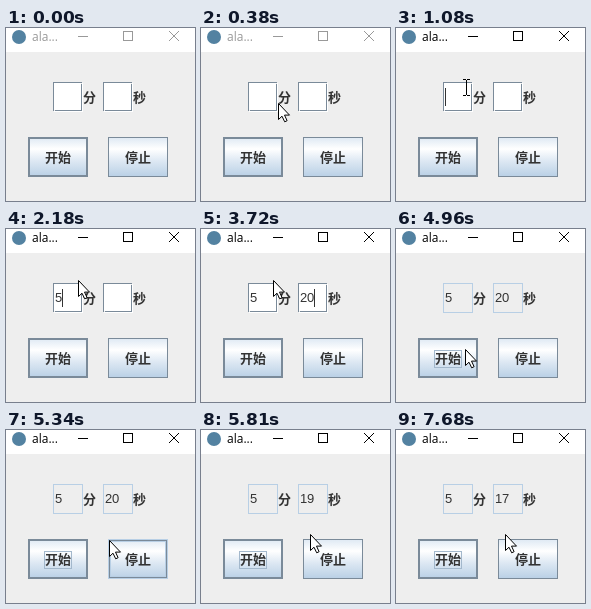
An HTML page with a canvas for the animation above (8 s loop, 189 by 173 pixels).

```html
<!DOCTYPE html>
<html lang="zh-CN">
<head>
<meta charset="utf-8">
<style>
  html, body { margin: 0; width: 100%; height: 100%; overflow: hidden; background: #eee; }
  canvas { display: block; }
</style>
</head>
<body>
<canvas id="stage" width="189" height="173"></canvas>
<script>
const ctx = document.getElementById('stage').getContext('2d');
const LOOP = 8000, TICK = 75, BLINK = 490;
const ENTER = 70, FOCUS = 620, PRESS = 4580, RELEASE = 4650;
const BACK = '#eee', DARK = '#7a8a99', LIGHT = '#b8cfe5', INK = '#333';
const CJK = 'bold 13px "Noto Sans CJK SC", "Noto Sans CJK", sans-serif';
const DIGITS = '13px "Liberation Sans", Arial, sans-serif';

// Pointer moves: from and until (ms), then the place reached
const MOVES = [
  [0, 370, 77, 75], [370, 620, 67, 67],
  [1000, 1160, 72, 51], [3960, 4040, 65, 50],
  [4100, 4560, 59, 123], [4890, 5430, 105, 110], [5570, 5800, 109, 104]
];
const KEYS = [[1700, '5'], [2560, '\t'], [2940, '2'], [3260, '0']];

function pointerAt(time) {
  const t = Math.floor(time / TICK) * TICK;
  let x = 98, y = 160;
  for (const [from, until, toX, toY] of MOVES) {
    const left = 1 - Math.min(1, Math.max(0, (t - from) / (until - from)));
    const eased = 1 - left * left;
    x += (toX - x) * eased;
    y += (toY - y) * eased;
  }
  return { x: Math.round(x), y: Math.round(y) };
}

const inside = (p, x, y, w, h) => p.x >= x && p.x < x + w && p.y >= y && p.y < y + h;

function fill(color, x, y, w, h) {
  ctx.fillStyle = color;
  ctx.fillRect(x, y, w, h);
}

function frame(color, x, y, w, h) {
  ctx.strokeStyle = color;
  ctx.lineWidth = 1;
  ctx.strokeRect(x + .5, y + .5, w - 1, h - 1);
}

function text(str, x, y, font, color = INK, align = 'left') {
  ctx.font = font;
  ctx.fillStyle = color;
  ctx.textAlign = align;
  ctx.fillText(str, x, y);
}

function titleBar(active) {
  const color = active ? '#000' : '#999';
  fill('#fff', 0, 0, 189, 24);
  ctx.fillStyle = '#5382a1';
  ctx.beginPath();
  ctx.arc(13, 9, 7, 0, 7);
  ctx.fill();
  text('ala...', 26, 13, '12px "Open Sans", sans-serif', color);
  fill(color, 72, 8, 10, 1);
  frame(color, 117, 3, 10, 10);
  ctx.beginPath();
  ctx.moveTo(163, 3);
  ctx.lineTo(173, 13);
  ctx.moveTo(173, 3);
  ctx.lineTo(163, 13);
  ctx.stroke();
}

function field(x, value, unit, locked) {
  const y = 54;
  if (locked) {
    frame(LIGHT, x, y, 30, 30);
  } else {
    fill('#fff', x + 1, y + 1, 29, 29);
    frame(DARK, x, y, 29, 29);
    fill(BACK, x + 1, y + 28, 1, 1);
    fill(BACK, x + 28, y + 1, 1, 1);
  }
  [...value].forEach((digit, i) => text(digit, x + 2 + 7 * i, 73, DIGITS));
  text(unit, x + 30, 74, CJK);
}

function button(x, label, { main, pressed, hover, focused }) {
  const y = 109, w = 60, h = 40;
  const shade = ctx.createLinearGradient(0, y, 0, y + h);
  shade.addColorStop(0, '#dde8f3');
  shade.addColorStop(.3, '#fff');
  shade.addColorStop(.6, '#dde8f3');
  shade.addColorStop(1, LIGHT);
  fill(pressed ? LIGHT : shade, x, y, w, h);
  frame(hover ? LIGHT : DARK, x, y, w, h);
  if (main || hover) frame(DARK, x + 1, y + 1, w - 2, h - 2);
  if (hover) frame(LIGHT, x + 2, y + 2, w - 4, h - 4);
  if (focused) frame('#a3b8cc', x + 16, y + 12, 28, 18);
  text(label, x + w / 2, 134, CJK, INK, 'center');
}

function arrow({ x, y }) {
  ctx.beginPath();
  [[0, 0], [0, 16], [3.5, 12.7], [6.2, 18.3], [8.6, 17.2], [6, 11.6], [11, 11.6]]
    .forEach(([dx, dy]) => ctx.lineTo(x + dx + .5, y + dy + .5));
  ctx.closePath();
  ctx.fillStyle = '#fff';
  ctx.strokeStyle = '#000';
  ctx.fill();
  ctx.stroke();
}

function textPointer({ x, y }) {
  fill('#000', x, y - 7, 1, 15);
  for (const dy of [-8, 8]) {
    fill('#000', x - 3, y + dy, 3, 1);
    fill('#000', x + 1, y + dy, 3, 1);
  }
}

function draw(t) {
  const pointer = pointerAt(t);
  const pressed = t >= PRESS && t < RELEASE;
  const locked = t >= RELEASE;

  const keys = KEYS.filter(([time]) => time <= t);
  const values = keys.map(([, key]) => key).join('').split('\t');
  const current = values.length - 1;
  const caretX = 49 + 50 * current + 7 * values[current].length;
  const lastInput = keys.length ? keys[keys.length - 1][0] : FOCUS;
  const caretOn = t >= FOCUS && t < PRESS && (t - lastInput) % (2 * BLINK) < BLINK;
  if (locked) values[1] = String(20 - Math.floor((t - RELEASE) / 1005));

  fill(BACK, 0, 0, 189, 173);
  titleBar(t >= FOCUS);
  field(47, values[0], '分', locked);
  field(97, values[1] || '', '秒', locked);
  if (caretOn) fill(INK, caretX, 60, 1, 18);
  button(22, '开始', { main: true, pressed, focused: t >= PRESS });
  button(102, '停止', { hover: inside(pointer, 102, 109, 60, 40) });
  if (t >= ENTER) (inside(pointer, 47, 54, 30, 30) ? textPointer : arrow)(pointer);
}

function tick() {
  draw(performance.now() % LOOP);
  requestAnimationFrame(tick);
}
tick();
</script>
</body>
</html>
```
